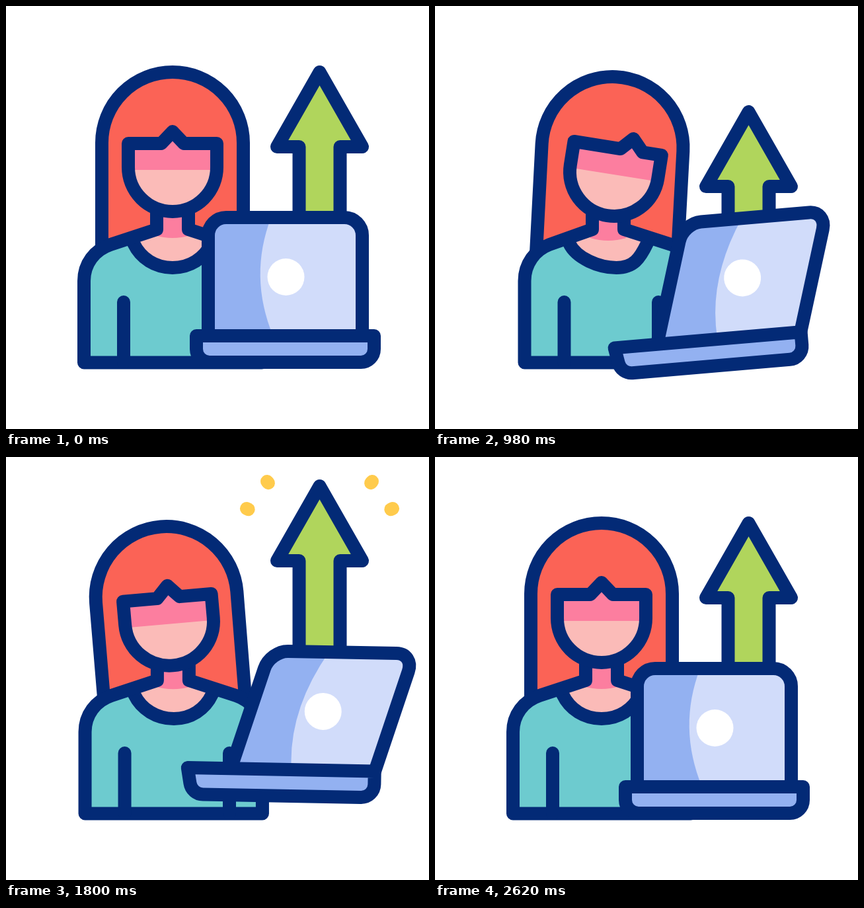
An HTML page with a canvas that plays this animation: 640 by 640 pixels, repeating every 3 s.

```html
<!DOCTYPE html>
<html lang="en">
<head>
<meta charset="utf-8">
<title>Growth</title>
<style>
  html, body { margin: 0; width: 100%; height: 100%; overflow: hidden; background: #fff; }
  canvas { display: block; width: 640px; height: 640px; }
</style>
</head>
<body>
<canvas id="stage" width="640" height="640"></canvas>
<script>
const ctx = document.getElementById('stage').getContext('2d');
const LOOP = 3000;
const NAVY = '#032a76', HAIR = '#fb6356', PINK = '#fc7e9f', SKIN = '#fbbbb8', TEAL = '#6dcbcf',
      GREEN = '#b0d55c', BLUE = '#93b1f1', PALE = '#d1dcfa', GOLD = '#ffcb4c';
const rad = d => d * Math.PI / 180;

// Eased value between [time, value] keys.
function at(t, ...keys) {
  if (t <= keys[0][0]) return keys[0][1];
  for (let i = 1; i < keys.length; i++) {
    const [t0, v0] = keys[i - 1], [t1, v1] = keys[i];
    if (t < t1) {
      const x = (t - t0) / (t1 - t0);
      return v0 + (v1 - v0) * x * x * (3 - 2 * x);
    }
  }
  return keys[keys.length - 1][1];
}

function fill(color) { ctx.fillStyle = color; ctx.fill(); }
function line(color = NAVY) { ctx.strokeStyle = color; ctx.lineWidth = 20; ctx.stroke(); }
function poly(...pts) {
  ctx.beginPath();
  pts.forEach(([x, y]) => ctx.lineTo(x, y));
}

function drawArrow(t) {
  const y = at(t, [200, 0], [800, 55], [1200, 67], [1800, -56], [2140, 27], [2600, 0]);
  const tilt = at(t, [200, 0], [500, 5], [800, 0]);
  ctx.save();
  ctx.translate(474.5, 310 + y);
  ctx.rotate(rad(tilt));
  poly([0, -210], [64.5, -97], [31, -97], [31, 90], [-31, 90], [-31, -97], [-64.5, -97]);
  ctx.closePath();
  fill(GREEN);
  line();
  ctx.restore();
}

function drawSparks(t) {
  if (t < 1490 || t > 1835) return;
  const head = at(t, [1480, 0], [1740, 1]), tail = at(t, [1560, 0], [1840, 1]);
  const ray = (x, y, dx, dy) => {
    for (const s of [-1, 1]) {
      poly([474.5 + s * (x + dx * tail), y + dy * tail], [474.5 + s * (x + dx * head), y + dy * head]);
      line(GOLD);
    }
  };
  ray(44.5, 77, 35, -40);
  ray(62.5, 101, 48, -23);
}

function drawHair(turn, back) {
  const top = 16.5 * turn - 12 * back, low = 8 * turn + 3.5 * back;
  const lean = Math.atan((top - low) / 160);
  ctx.beginPath();
  ctx.moveTo(145 + low, 374);
  ctx.arc(252 + top, 207 + 7 * turn + 5 * back, 107, Math.PI + lean, lean);
  ctx.lineTo(359 + low, 374);
  fill(HAIR);
  line();
}

function drawBody(turn) {
  const l = 17.5 * turn, n = 10 * turn, r = 10.5 * turn, c = 22.5 * turn;
  const outline = () => {
    ctx.beginPath();
    ctx.moveTo(118 + l, 539.5);
    ctx.lineTo(118 + l, 416);
    ctx.bezierCurveTo(118 + l, 390, 134 + l, 369, 158 + 15 * turn, 361);
    ctx.lineTo(228 + n, 338);
    ctx.lineTo(228 + n, 300);
    ctx.lineTo(276 + n, 300);
    ctx.lineTo(276 + n, 338);
    ctx.lineTo(347 + r, 361);
    ctx.bezierCurveTo(371 + r, 369, 387 + r, 390, 387 + r, 416);
    ctx.lineTo(387 + r, 539.5);
    ctx.closePath();
  };
  const collar = () => {
    ctx.moveTo(193 + n, 359);
    ctx.bezierCurveTo(204 + n, 382, 226 + c, 396, 252 + c, 396);
    ctx.bezierCurveTo(278 + c, 396, 300 + n, 382, 311 + n, 359);
  };
  outline();
  fill(TEAL);

  ctx.beginPath();
  collar();
  ctx.lineTo(276 + n, 338);
  ctx.lineTo(276 + n, 300);
  ctx.lineTo(228 + n, 300);
  ctx.lineTo(228 + n, 338);
  fill(SKIN);

  const s = 4 * turn;
  poly([228 + n, 300], [276 + n, 300], [279 + n, 347 + s]);
  ctx.quadraticCurveTo(252 + n, 355 + s, 225 + n, 347 + s);
  fill(PINK);

  ctx.beginPath();
  collar();
  line();
  outline();
  line();
  for (const x of [178 + l, 338]) {
    poly([x, 448], [x, 539]);
    line();
  }
}

function drawFace(turn, back) {
  const n = 21 * turn;
  ctx.save();
  ctx.translate(252 + 19 * turn - 7.5 * back, 244 + 7 * turn + 4.5 * back);
  ctx.rotate(rad(9 * turn - 6.5 * back));
  const shape = () => {
    poly([-67, 0], [-67, -36], [n - 17, -36], [n, -54], [n + 17, -36], [67, -36], [67, 0]);
    ctx.arc(0, 0, 67, 0, Math.PI);
    ctx.closePath();
  };
  shape();
  fill(SKIN);
  ctx.save();
  ctx.clip();
  ctx.fillStyle = PINK;
  ctx.fillRect(-70, -60, 140, 64);
  ctx.restore();
  shape();
  line();
  ctx.restore();
}

function drawLaptop(t) {
  const w = at(t, [200, 0], [800, 1], [2120, 1], [2600, 0]);
  const e = at(t, [800, 0], [1200, 1], [1600, 1], [2080, 0]);
  const tilt = rad(at(t, [200, 0], [800, -4.9], [980, -4.9], [1580, 4.6], [1600, 4.6], [2120, -6.1], [2600, 0]));
  const lift = at(t, [200, 0], [790, 27.5], [800, 27.5], [1350, -60], [1458, -60], [2170, 12], [2600, 0]);
  const k = 0.29 * w + 0.04 * e;
  const left = -251 + 34 * w + 4 * e, right = -18 + 19 * w + 4 * e;
  const px = x => left + (x - 306) * (right - left) / 233;

  ctx.save();
  ctx.translate(557, 539 + lift + 134.5 * Math.sin(tilt));
  ctx.rotate(tilt);

  // Paths are built sheared, then painted unsheared so strokes stay even.
  const sheared = build => {
    ctx.save();
    ctx.transform(1, 0, -k, 1, -50 * k, 0);
    ctx.beginPath();
    build();
    ctx.restore();
  };
  const lid = () => {
    ctx.moveTo(left, -40);
    ctx.arcTo(left, -219, right, -219, 27);
    ctx.arcTo(right, -219, right, -40, 27);
    ctx.lineTo(right, -40);
  };
  sheared(lid);
  fill(BLUE);
  ctx.save();
  ctx.clip();
  sheared(() => {
    ctx.moveTo(px(401), -219);
    ctx.quadraticCurveTo(px(367), -130, px(404), -40);
    ctx.lineTo(right, -40);
    ctx.lineTo(right, -219);
  });
  fill(PALE);
  ctx.restore();
  ctx.beginPath();
  ctx.arc(px(423.5) + 79 * k, -129, 28, 0, 7);
  fill('#fff');
  sheared(lid);
  line();

  const low = -269 - 7 * w;
  poly([-269 - 14 * w, -40], [0, -40]);
  ctx.arcTo(0, 0, -30, 0, 20);
  ctx.arcTo(low, 0, -269 - 14 * w, -40, 20);
  ctx.closePath();
  fill(BLUE);
  line();
  ctx.restore();
}

function draw(t) {
  const turn = at(t, [200, 0], [800, 1], [1400, 1], [1890, 0]);
  const back = at(t, [1400, 0], [1900, 1], [2400, 0]);
  ctx.fillStyle = '#fff';
  ctx.fillRect(0, 0, 640, 640);
  ctx.lineJoin = ctx.lineCap = 'round';
  drawHair(turn, back);
  drawBody(turn);
  drawFace(turn, back);
  drawSparks(t);
  drawArrow(t);
  drawLaptop(t);
}

let start;
function tick(now) {
  if (start === undefined) start = now;
  draw((now - start) % LOOP);
  requestAnimationFrame(tick);
}
draw(0);
requestAnimationFrame(tick);
</script>
</body>
</html>
```
